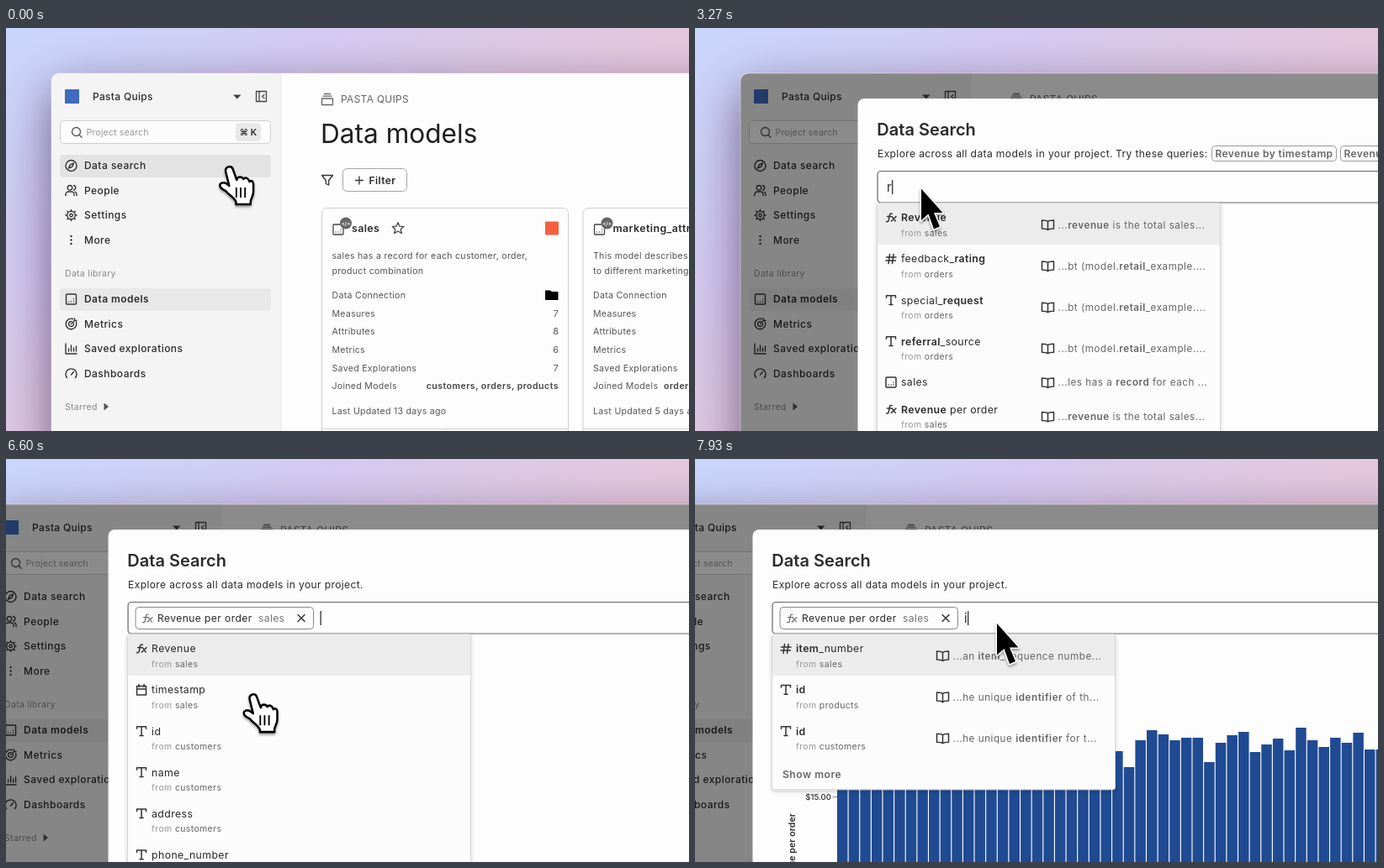
Write an HTML page that moves like this. It is 812 px wide and 480 px high and loops after 8000 ms.

```html
<!DOCTYPE html>
<html lang="en">
<head>
<meta charset="utf-8">
<title>Data search</title>
<style>
  html, body { margin: 0; width: 100%; height: 100%; overflow: hidden; }
  svg { display: block; width: 812px; height: 480px; font-family: Inter, "Open Sans", sans-serif; }
  text { white-space: pre; }
</style>
</head>
<body>
<svg id="stage" viewBox="0 0 812 480"></svg>
<script>
const LOOP = 8000;
const INK = '#2b2b2b', GREY = '#666', PALE = '#999';

// Drawing helpers
const ring = r => `M${-r} 0a${r} ${r} 0 1 0 ${2 * r} 0a${r} ${r} 0 1 0 ${-2 * r} 0`;
const dots = pts => pts.map(([x, y]) => `M${x} ${y}v.01`).join('');
const spokes = Array.from({ length: 8 }, (_, i) => {
  const a = i * Math.PI / 4, c = Math.cos(a), s = Math.sin(a);
  return `M${c * 4.8} ${s * 4.8}L${c * 6.6} ${s * 6.6}`;
}).join('');

const ICONS = {
  compass: ring(6.5) + 'M3-3L1.2 1.2-3 3-1.2-1.2Z',
  people: 'M-6.5 6V4.5A3 3 0 0 1-3.5 1.5H.5A3 3 0 0 1 3.5 4.5V6M-4.3-3.2a2.8 2.8 0 1 0 5.6 0a2.8 2.8 0 1 0-5.6 0M3-6a2.8 2.8 0 0 1 0 5.5M6.5 6V4.5A3 3 0 0 0 4.5 1.7',
  gear: ring(4.8) + ring(1.7) + spokes,
  more: dots([[0, -4.5], [0, 0], [0, 4.5]]),
  model: 'M-5-6H5Q6-6 6-5V5Q6 6 5 6H-5Q-6 6-6 5V-5Q-6-6-5-6Z' + dots([[-3, 3], [0, 3], [3, 3], [3, 0]]),
  target: 'M2-6A6.3 6.3 0 1 0 6-2M.5-3A3 3 0 1 0 3-.5M0 0L4-4M4-6.5V-4H6.5',
  bars: 'M-6.5-6V6H6.5M-3 3V0M0 3V-4M3 3V-1M6 3V-3',
  gauge: 'M-5 5A6.5 6.5 0 1 1 5 5M0 1.5L3-2',
  stack: 'M-6.5-1H6.5V6.5H-6.5ZM-5-3.8H5M-3.5-6.5H3.5',
  panel: 'M-6-6H6V6H-6ZM-2.5-6V6M3.5-2L1 0 3.5 2',
  lens: 'M-5.5-1a5 5 0 1 0 10 0a5 5 0 1 0-10 0M3 2.7L6 5.8',
  funnel: 'M-6.5-6H6.5L1.7 0V5.5L-1.7 4V0Z',
  plus: 'M-4.5 0H4.5M0-4.5V4.5',
  cross: 'M-4-4L4 4M4-4L-4 4',
  star: 'M0-6.8L2-2.3 6.8-1.9 3.2 1.3 4.3 6 0 3.5-4.3 6-3.2 1.3-6.8-1.9-2-2.3Z',
  book: 'M0-4C-1.5-5.5-4-5.5-7-5.5V4.5C-4 4.5-1.5 4.5 0 6C1.5 4.5 4 4.5 7 4.5V-5.5C4-5.5 1.5-5.5 0-4V6',
  fx: 'M1.2-4.8C-.6-5.4-1.3-4.6-1.6-3L-2.7 2.8C-3 4.4-3.8 5-5.5 4.5M-4.4-1.4H.2M1.2-1.4L5.2 4M6-1.4L.4 4',
  hash: 'M-1.5-5.5L-3 5.5M3-5.5L1.5 5.5M-5.5-2H6M-6 2H5.5',
  type: 'M-5.5-3V-5.5H5.5V-3M0-5.5V5.2M-2 5.2H2',
  date: 'M-5.5-4.5H5.5V6H-5.5ZM-5.5-1H5.5M-3-6.5V-3.5M3-6.5V-3.5'
};

const icon = (name, x, y, color = INK, w = 1.3) =>
  `<path transform="translate(${x} ${y})" d="${ICONS[name]}" fill="none" stroke="${color}" stroke-width="${w}" stroke-linecap="round" stroke-linejoin="round"/>`;

// Words between asterisks are set semi-bold.
const rich = s => s.replace(/\*(.+?)\*/g, '<tspan font-weight="600">$1</tspan>');

const text = (x, y, s, size, { w = 400, fill = INK, ls = .3, anchor = 'start', more = '' } = {}) =>
  `<text x="${x}" y="${y}" font-size="${size}" font-weight="${w}" fill="${fill}" letter-spacing="${ls}" text-anchor="${anchor}" ${more}>${rich(s)}</text>`;

const box = (x, y, w, h, r, fill, stroke = 'none', more = '') =>
  `<rect x="${x}" y="${y}" width="${w}" height="${h}" rx="${r}" fill="${fill}" stroke="${stroke}" ${more}/>`;

// Sidebar
const menu = [
  ['compass', 164, 'Data search'], ['people', 193.5, 'People'], ['gear', 223, 'Settings'],
  ['more', 252.5, 'More'], ['model', 323, 'Data models', 600], ['target', 352.5, 'Metrics'],
  ['bars', 382, 'Saved explorations'], ['gauge', 411.5, 'Dashboards']
];

const sidebar = () => box(54, 54, 273, 440, 0, '#f4f4f4') +
  '<path d="M327 54V480" stroke="#e8e8e8"/>' +
  box(70, 73, 17, 17, 1, '#3f6cc0') +
  text(103, 86, 'Pasta Quips', 12, { w: 500 }) +
  '<path d="M270 79.5H279.5L274.8 84.5Z" fill="#444"/>' + icon('panel', 303.5, 81.5, '#444') +
  box(64.5, 110.5, 250, 27, 4, '#fcfcfc', '#cfcfcf') + icon('lens', 84, 124.5, '#555') +
  text(95.5, 128, 'Project search', 10.7, { fill: PALE, ls: .1 }) +
  box(273, 113, 30, 22, 4, '#e8e8e8') +
  text(288, 128, '⌘ K', 10.5, { w: 600, anchor: 'middle', ls: 0 }) +
  box(64, 151, 251, 27, 4, '#e3e3e3', 'none', 'id="hover"') +
  box(64, 310, 251, 27, 4, '#e8e8e8') +
  menu.map(([i, y, s, w = 500]) => icon(i, 77.5, y, '#333', i === 'more' ? 2.4 : 1.4) + text(93, y + 4.3, s, 12, { w, ls: .45 })).join('') +
  text(70, 296, 'Data library', 10.5, { fill: '#888' }) +
  text(70, 455, 'Starred', 10.5, { fill: '#888' }) +
  '<path d="M116.5 446.5V455.5L122 451Z" fill="#555"/>';

// Model cards
const card = (x, title, lines, counts, joined, days) => {
  const l = x + 12.5, r = x + 282, dim = { fill: '#555', ls: .28 }, end = { ...dim, anchor: 'end' };
  const labels = ['Data Connection', 'Measures', 'Attributes', 'Metrics', 'Saved Explorations', 'Joined Models'];
  return box(x + .5, 214.5, 293, 300, 6, '#fdfdfd', '#cfcfcf') +
    `<path d="M${x} 477.5h294M${x + 147} 477.5v3" stroke="#d5d5d5"/>` +
    icon('model', x + 20, 240, '#444') +
    `<circle cx="${x + 29}" cy="232.5" r="7" fill="#666"/>` +
    text(x + 29, 234.8, '&lt;/&gt;', 6, { w: 700, fill: '#fff', ls: 0, anchor: 'middle' }) +
    text(x + 36, 243.3, title, 12.4, { w: 600, ls: .4 }) +
    lines.map((s, i) => text(l, 275 + i * 18, s, 10.6, dim)).join('') +
    labels.map((s, i) => text(l, 321.8 + i * 21.7, s, 10.6, dim)).join('') +
    counts.map((s, i) => text(r, 343.5 + i * 21.7, s, 10.6, end)).join('') +
    text(joined[1] || r, 430.3, joined[0], 10.6, { ls: .45, w: 600, fill: '#444', anchor: joined[1] ? 'start' : 'end' }) +
    text(l, 459.5, `Last Updated ${days} days ago`, 10.6, dim);
};

const content = () => icon('stack', 382, 85, '#666') +
  text(398, 89, 'PASTA QUIPS', 12, { fill: GREY }) +
  text(374, 137, 'Data models', 31.6, { ls: 0, fill: '#1f1f1f' }) +
  icon('funnel', 382, 181.5, '#333') +
  box(400.5, 167.5, 76, 27, 5, '#fdfdfd', '#a5a5a5') + icon('plus', 420, 181.5, '#333') +
  text(431.5, 185.5, 'Filter', 12, { w: 600, ls: .4 }) +
  card(375, 'sales', ['sales has a record for each customer, order,', 'product combination'],
    ['7', '8', '6', '7'], ['customers, orders, products'], 13) +
  icon('star', 466, 238.5, '#444') + box(641, 230.5, 16, 16, 1, '#f2603f') +
  '<path d="M641 312.5H647L649 314H656.5V324H641Z" fill="#000"/>' +
  card(685.5, 'marketing_attribution', ['This model describes the', 'to different marketing'],
    [], ['orders', 782], 5);

// Suggestion lists
const rowH = row => row[2] ? 49.1 : 32;
const cell = ([kind, name, from, note], y) =>
  icon(kind, 233, y + (from ? 17 : 16.5), '#333', 1.5) +
  text(245, y + (from ? 21.3 : 20.8), name, 12.3, { ls: .38 }) +
  (from ? text(245, y + 39, `<tspan fill="${PALE}">from</tspan> ${from}`, 10.5, { fill: GREY, ls: .35 }) : '') +
  (note ? icon('book', 419.5, y + (from ? 25.5 : 17), '#333', 1.5) +
    text(431.5, y + (from ? 29.7 : 20.8), note, 11.7, { fill: GREY, ls: .52 }) : '');

const list = (id, rows, foot = '') => {
  let y = 209, out = '';
  for (const row of rows) { out += cell(row, y); y += rowH(row); }
  if (foot) out += text(229, y + 23.5, foot, 12.1, { w: 600, fill: GREY, ls: .5 });
  const h = y - 209 + (foot ? 38 : 1.5);
  return `<g id="${id}">` + box(216.5, 208.5, 408, h, 3, '#fcfcfc', '#d6d6d6', 'filter="url(#soft)"') +
    box(217, 209, 407, 49.1, 0, '#ececec', 'none', 'class="pick"') + out + '</g>';
};

const total = '...*revenue* is the total sales...';
const retail = '...bt (model.*retail*_example....';
const lists = () =>
  '<g id="loading">' + box(216.5, 208.5, 408, 41.5, 3, '#fcfcfc', '#d6d6d6', 'filter="url(#soft)"') +
  text(420.5, 235.3, 'Loading...', 12.3, { anchor: 'middle', ls: .35 }) + '</g>' +
  list('all', [
    ['fx', 'Revenue', 'sales'], ['date', 'timestamp', 'sales'], ['type', 'id', 'customers'],
    ['type', 'name', 'customers'], ['type', 'address', 'customers'], ['type', 'phone_number', 'customers']
  ]) +
  list('r', [
    ['fx', '*Revenue*', 'sales', total], ['hash', 'feedback_*rating*', 'orders', retail],
    ['type', 'special_*request*', 'orders', retail], ['type', '*referral*_source', 'orders', retail],
    ['model', 'sales', '', '...les has a *record* for each ...'], ['fx', '*Revenue* per order', 'sales', total]
  ]) +
  list('rev', [
    ['fx', '*Revenue*', 'sales', total], ['fx', '*Revenue* per order', 'sales', total],
    ['fx', 'Avg unit price', 'sales', total], ['fx', 'Attributable *Revenue*', 'marketing_attribution'],
    ['fx', '*Revenue* per customer', 'sales']
  ]) +
  list('i', [
    ['hash', '*item*_number', 'sales', '...an *item*_sequence numbe...'],
    ['type', '*id*', 'products', '...he unique *identifier* of th...'],
    ['type', '*id*', 'customers', '...he unique *identifier* for t...']
  ], 'Show more');

const tops = [348, 367, 335, 323, 328, 335, 332, 332, 361, 338, 329, 325,
  349, 340, 333, 347, 320, 335, 343, 332, 338, 326, 346, 346];

const chart = () => '<g id="chart">' +
  Array.from({ length: 48 }, (_, i) => {
    const y = tops[i % tops.length];
    return box(294 + i * 13.63, y, 12.5, 490 - y, 0, '#204a92');
  }).join('') +
  '<path d="M288.500 402.500H294" stroke="#888"/>' +
  text(287, 405.5, '$15.00', 9.6, { w: 500, ls: 0, anchor: 'end' }) +
  text(0, 0, 'Revenue per order', 10.5, { w: 600, ls: .1, anchor: 'end', more: 'transform="translate(244 422) rotate(-90)"' }) +
  '</g>';

const query = (x, w, s) => box(x + .5, 140.5, w, 18, 4, '#fdfdfd', '#999') +
  text(x + 4.5, 154, s, 12, { w: 600, fill: GREY, ls: .4 });

const modal = () => '<g id="modal">' +
  '<path d="M193.500 490V92a8 8 0 0 1 8-8H1200V490Z" fill="#fdfdfd"/>' +
  text(216.3, 128, 'Data Search', 20, { w: 600, ls: 0 }) +
  text(217, 154, 'Explore across all data models in your project.', 12.1, { ls: .36 }) +
  '<g id="queries">' + text(500, 154, 'Try these queries:', 12.1, { ls: .36 }) +
  query(614, 148, 'Revenue by timestamp') + query(767, 150, 'Revenue by product') + '</g>' +
  chart() +
  box(217, 170.5, 980, 37.5, 4, '#fdfdfd', '#666', 'stroke-width="1.2"') +
  '<g id="chip">' + box(226, 176.5, 211.5, 26, 4, '#fdfdfd', '#888') + icon('fx', 240, 190, GREY, 1.2) +
  text(252, 194, 'Revenue per order', 12.1, { ls: .4 }) +
  text(372, 194, 'sales', 12.1, { fill: '#777', ls: .35 }) + icon('cross', 423, 189.5, '#333', 1.5) + '</g>' +
  text(228, 195, 'Start typing to see suggestions...', 14.9, { fill: '#666', ls: .1, more: 'id="hint"' }) +
  text(228, 195, '', 14.9, { ls: 0, more: 'id="typed"' }) +
  '<rect id="caret" y="181" width="1.2" height="17" fill="#222"/>' +
  lists() + '</g>';

const pointers = () => '<g id="cursor" filter="url(#drop)" stroke-linejoin="round">' +
  '<g id="hand" transform="scale(.94 1)"><path d="M-3 6C-4 0 4-2 6 3L11 16C12 11 18 12 19.500 15C22 12 26 14 27 18C30 16 32.500 18 32 22V30C32 36 28.500 38 28.500 42V45H10V42C8 37 1 34-3 29C-8 27-11 24-10 21C-7 18-3 19 1.500 23Z" fill="#fff" stroke="#000" stroke-width="2.600"/>' +
  '<path d="M10.500 25V37M16 25V37M21.500 25V37" stroke="#000" stroke-width="2"/></g>' +
  '<path id="arrow" d="M0 1V38.500L8.500 31 15 49 22 46 15 29.500H25.500Z" fill="#000" stroke="#fff" stroke-width="3" paint-order="stroke"/></g>';

const frame = 'M54 500V63a9 9 0 0 1 9-9H1200V500Z';
const stage = document.getElementById('stage');
stage.innerHTML = `
  <defs>
    <linearGradient id="sky" gradientUnits="userSpaceOnUse" x1="0" y1="0" x2="288" y2="384">
      <stop offset="0" stop-color="#c9d6fc"/><stop offset=".5" stop-color="#d4caf0"/><stop offset="1" stop-color="#e5c7dd"/>
    </linearGradient>
    <filter id="blur" filterUnits="userSpaceOnUse" x="-150" y="-100" width="1600" height="900"><feGaussianBlur stdDeviation="29"/></filter>
    <filter id="soft" x="-5%" y="-5%" width="110%" height="130%"><feDropShadow dx="0" dy="2" stdDeviation="2.500" flood-opacity=".18"/></filter>
    <filter id="drop" filterUnits="userSpaceOnUse" x="-30" y="-20" width="90" height="90"><feDropShadow dx="0" dy="2" stdDeviation="1.800" flood-opacity=".4"/></filter>
    <clipPath id="pane"><path d="${frame}"/></clipPath>
  </defs>
  <rect width="812" height="480" fill="url(#sky)"/>
  <g id="win">
    <rect x="54" y="74" width="1146" height="600" rx="9" fill="#1c1030" opacity=".55" filter="url(#blur)"/>
    <g clip-path="url(#pane)">
      <path d="${frame}" fill="#fdfdfd"/>${sidebar()}${content()}
      <path id="shade" d="${frame}"/>${modal()}
    </g>
    <path d="${frame}" fill="none" stroke="#fff" stroke-opacity=".4"/>
  </g>${pointers()}`;

const el = {};
stage.querySelectorAll('[id]').forEach(n => el[n.id] = n);
const show = (id, on) => el[id].style.display = on ? '' : 'none';
const clamp = v => Math.max(0, Math.min(1, v));
const smooth = v => v * v * (3 - 2 * v);

// Pointer path inside the window: time, x, y
const path = [
  [0, 264, 165], [450, 264, 165], [1000, 216.5, 165], [1650, 269, 191], [5000, 269, 190],
  [5900, 360, 275], [6300, 360, 275], [7000, 371, 288], [7750, 484, 195], [LOOP, 484, 195]
];
const pointAt = t => {
  const k = path.findIndex(p => p[0] > t), a = path[k - 1], b = path[k];
  const f = smooth((t - a[0]) / (b[0] - a[0]));
  return [a[1] + (b[1] - a[1]) * f, a[2] + (b[2] - a[2]) * f];
};

// Edits of the search field: time, text
const edits = [[850, ''], [3070, 'r'], [3300, 're'], [3480, 'rev'], [6350, ''], [7850, 'i']];
const panels = [[0, 'loading'], [1600, 'all'], [3130, 'r'], [3650, 'rev'], [6400, 'all'], [7880, 'i']];
const last = (steps, t) => steps.filter(s => s[0] <= t).pop() || steps[0];

function draw(t) {
  const w = Math.max(0, t - 6350) * .0077;
  const pan = 125 * (1 - (1 + w) * Math.exp(-w));
  el.win.setAttribute('transform', `translate(${-pan} 0)`);

  const fade = clamp((t - 850) / 200);
  show('hover', t < 850);
  show('modal', fade > 0);
  el.modal.setAttribute('opacity', fade);
  el.shade.setAttribute('opacity', .45 * (1 - Math.pow(1 - fade, 1.5)));

  const picked = t >= 6350;
  show('queries', t >= 1600 && !picked);
  show('chip', picked);
  show('chart', t >= 6700);
  show('hint', t < 3070);

  const [since, typed] = last(edits, t);
  const x = picked ? 445 : 228;
  el.typed.textContent = typed;
  el.typed.setAttribute('x', x);
  el.caret.setAttribute('x', x + (typed ? el.typed.getComputedTextLength() : 0) + .5);
  show('caret', (t - since) % 1060 < 530);

  const [cx, cy] = pointAt(t);
  const open = last(panels, t)[1];
  ['loading', 'all', 'r', 'rev', 'i'].forEach(id => show(id, id === open));
  el.rev.querySelector('.pick').setAttribute('y', cy > 258 ? 258.1 : 209);

  const hand = t < 1250 || (t > 4600 && t < 7400);
  show('hand', hand);
  show('arrow', !hand);
  el.cursor.setAttribute('transform', `translate(${cx - pan} ${cy})`);
}

function tick() {
  draw(performance.now() % LOOP);
  requestAnimationFrame(tick);
}
tick();
</script>
</body>
</html>
```
